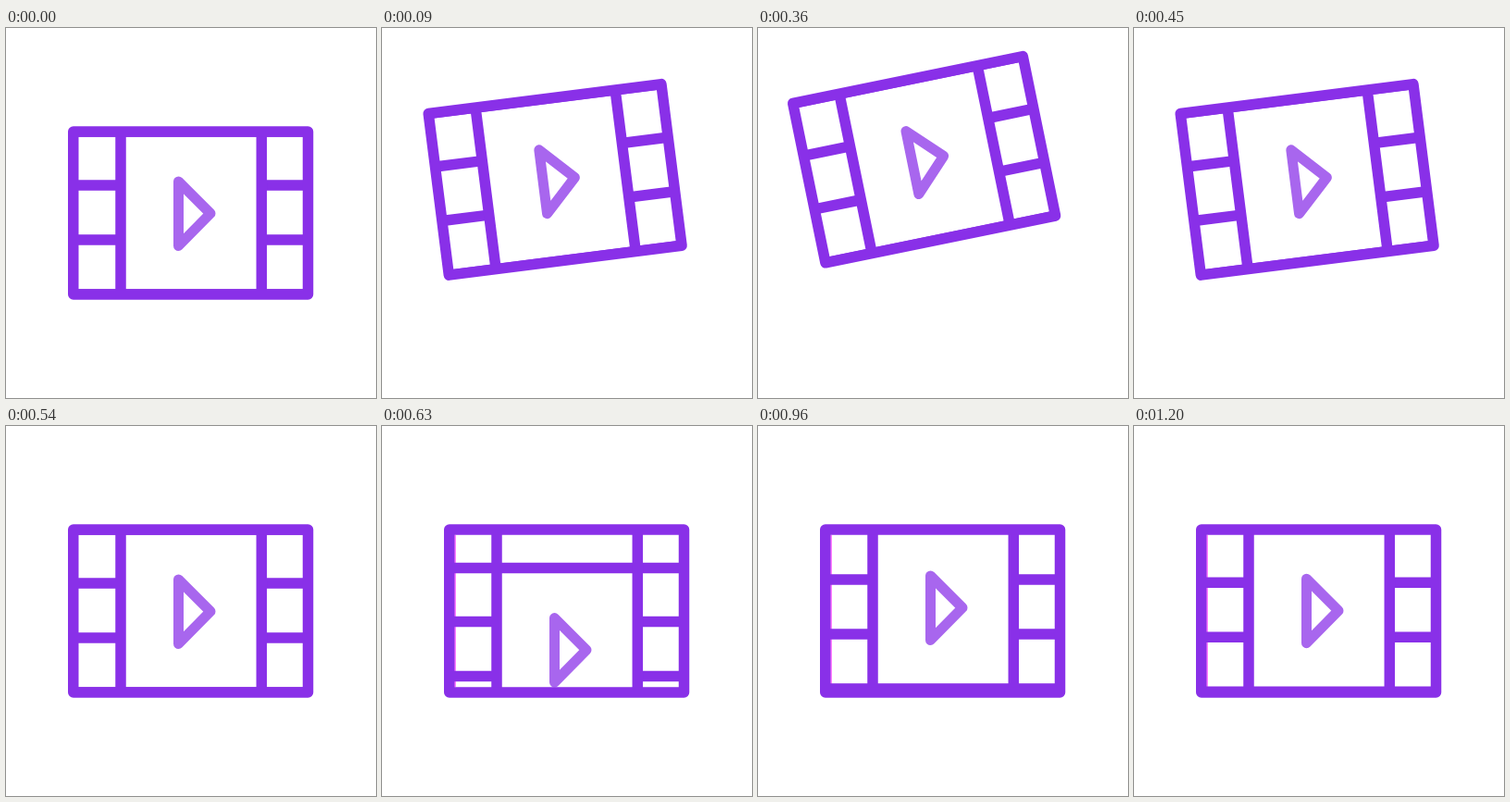
An HTML page that plays this animation: 400 px wide and 400 px high, repeating every 3260 ms.

```html
<!DOCTYPE html>
<html lang="en">
<head>
<meta charset="utf-8">
<title>Film strip</title>
<style>
  html, body { margin: 0; width: 100%; height: 100%; overflow: hidden; background: #fff; }
  svg { display: block; width: 100%; height: 100%; }
  .line { fill: none; stroke: #8930e8; stroke-width: 11.5; stroke-linejoin: round; }
  .play { fill: none; stroke: #a866ee; stroke-width: 11; stroke-linejoin: round; }
  .fringe { stroke: #f0f; stroke-width: 1; }
</style>
</head>
<body>
<svg viewBox="0 0 400 400">
  <defs>
    <clipPath id="gate"><rect x="72" y="112" width="255" height="176"/></clipPath>
    <g id="cell">
      <path class="line" d="M73 170H124M276 170H326M73 229H124M276 229H326M73 288H326"/>
      <path class="play" d="M186.5 166V235.5L221 200.5Z"/>
    </g>
  </defs>
  <g id="film">
    <path id="fringe" class="fringe" d="M79 118V282"/>
    <g clip-path="url(#gate)">
      <g id="strip">
        <use href="#cell"/>
        <use href="#cell" y="-176"/>
      </g>
    </g>
    <path class="line" d="M124 112V288M276.3 112V288"/>
    <rect class="line" x="72.75" y="112" width="253.75" height="176"/>
  </g>
</svg>
<script>
  const LOOP = 3260, STEP = 30, LAND = 540, END = 1200;
  const film = document.getElementById('film');
  const strip = document.getElementById('strip');
  const fringe = document.getElementById('fringe');

  // Scroll knots: [ms after landing, offset, speed in px per step]
  const knots = [[0, 0, 14.2], [210, 95, 13.2], [420, 172, 1.1], [660, 175.2, 0.1]];

  function scroll(ms) {
    const i = Math.max(1, knots.findIndex(k => ms <= k[0]));
    const [t0, y0, v0] = knots[i - 1], [t1, y1, v1] = knots[i];
    const n = (t1 - t0) / STEP, u = (ms - t0) / (t1 - t0), w = 1 - u;
    return y0 * w * w * (1 + 2 * u) + y1 * u * u * (3 - 2 * u)
      + n * u * w * (v0 * w - v1 * u);
  }

  function draw(now) {
    const t = Math.min(Math.floor((now % LOOP) / STEP) * STEP, END);
    const u = Math.min(t / LAND, 1);
    const toss = 4 * u * (1 - u);
    film.setAttribute('transform',
      `translate(${-22.5 * toss} ${-65 * toss}) rotate(${-13 * toss} 199.5 200)`);
    strip.setAttribute('transform', `translate(0 ${t > LAND ? scroll(t - LAND) : 0})`);
    fringe.setAttribute('visibility', t > LAND ? 'visible' : 'hidden');
  }

  let start;
  function tick(now) {
    start ??= now;
    draw(now - start);
    requestAnimationFrame(tick);
  }
  draw(0);
  requestAnimationFrame(tick);
</script>
</body>
</html>
```
